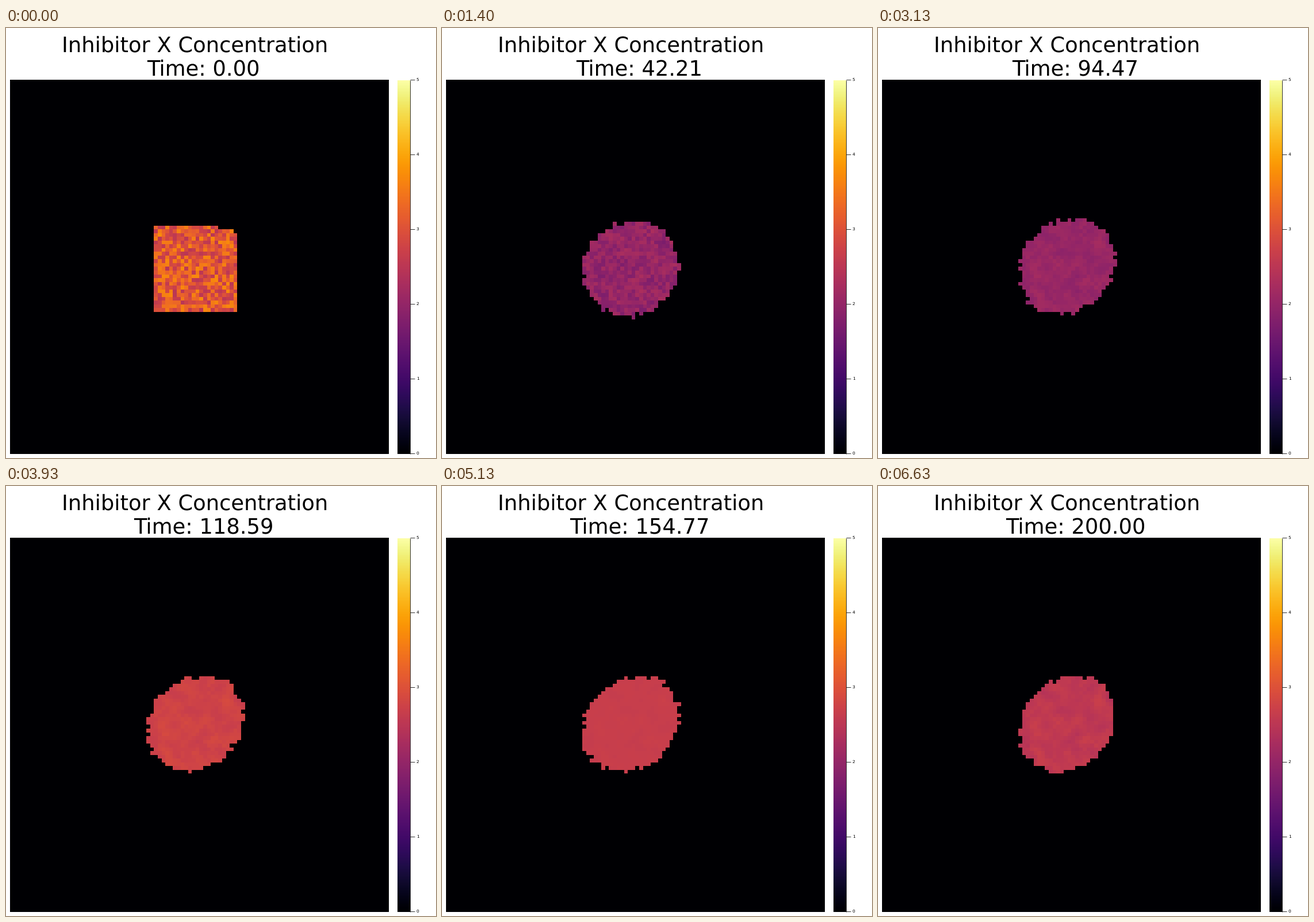
Recreate the animation shown at these times as a matplotlib script. Size 748 by 748 pixels, loop 6660 ms.

```python
import numpy as np
import matplotlib.pyplot as plt
from matplotlib.animation import FuncAnimation

SIZE, DPI, FRAMES, N, CELLS = 748, 100, 200, 100, 500
PX = 72 / DPI
plt.rcParams["font.family"] = "DejaVu Sans"
plt.rcParams["text.hinting"] = "none"

# Level and contrast of the concentration at a few steps
STEPS = [0, 20, 65, 94, 118, 154, 199]
MEAN = [3.1, 1.95, 2.1, 2.05, 2.76, 2.67, 2.55]
SPREAD = [0.62, -0.28, -0.31, 0.17, 0.12, 0.04, 0.14]

rng = np.random.default_rng(7)
rows, cols = np.mgrid[0:N, 0:N] + 0.5


def spot(col, row, radius):
    return np.exp(-((cols - col) ** 2 + (rows - row) ** 2) / radius ** 2)


def blur(a):
    a = sum(np.roll(a, d, 0) for d in (-1, 0, 1))
    return sum(np.roll(a, d, 1) for d in (-1, 0, 1)) / 9


grain = rng.uniform(-1, 1, (N, N))
smooth = (2.2 * blur(grain) + 0.25 - 1.5 * spot(36.5, 53.5, 3)
          - 0.6 * spot(45.5, 53.5, 3) - 0.5 * spot(54.5, 49.5, 4))
phase = rng.uniform(0, 2 * np.pi, (N, N))
speed = rng.uniform(0.15, 0.6, (N, N))

# Starting block, with a notch in its upper right edge
block = (np.minimum(11 - abs(cols - 49), 11.5 - abs(rows - 50.5))
         - 0.1 * spot(57.5, 39.5, 2.5))


def ellipse(i):
    """Blob that drifts up and stretches along the rising diagonal."""
    grown = min(1, i / 120)
    dx, dy = cols - 48.8, rows - 51 + 1.3 * grown
    stretch = 1 + 0.2 * grown
    rising, falling = (dx - dy) / np.sqrt(2), (dx + dy) / np.sqrt(2)
    return 12.6 - np.sqrt(rising ** 2 / stretch + falling ** 2 * stretch)


def blob(i):
    """The CELLS cells deepest inside the outline, so the area never changes."""
    relaxed = 1 - np.exp(-i / 8)
    field = (1 - relaxed) * block + relaxed * ellipse(i)
    field = field + 0.5 * relaxed * np.sin(phase + speed * i)
    return field >= np.partition(field, -CELLS, axis=None)[-CELLS]


def concentration(i):
    mix = min(0.7, i / 180)
    texture = (1 - mix) * grain + mix * smooth
    value = np.interp(i, STEPS, MEAN) + np.interp(i, STEPS, SPREAD) * texture
    return np.where(blob(i), value, 0)


fig = plt.figure(figsize=(SIZE / DPI, SIZE / DPI), dpi=DPI, facecolor="white")
ax = fig.add_axes([0, 0, 1, 1])


def heat(data, left, right, top):
    return ax.imshow(data, cmap="inferno", vmin=0, vmax=5, aspect="auto",
                     interpolation="nearest", extent=(left, right, 741, top))


grid = heat(concentration(0), 7, 666, 90)
heat(np.linspace(5, 0, 256)[:, None], 681, 703, 91)

line = dict(color="black", lw=0.8 * PX, solid_capstyle="butt")
ax.plot([703.5, 703.5], [90.5, 740.5], **line)
for v in range(6):
    y = 740.2 - 129.95 * v
    ax.plot([703.5, 711], [y, y], **line)
    ax.text(713.8, y, str(v), size=7.5 * PX, ha="left", va="center")

title = dict(size=36.9 * PX, ha="center", va="baseline")
ax.text(328.5, 41, "Inhibitor X Concentration", **title)
clock = ax.text(343.5, 82, "", **title)

ax.set(xlim=(0, SIZE), ylim=(SIZE, 0))
ax.axis("off")


def update(i):
    grid.set_data(concentration(i))
    clock.set_text(f"Time: {200 * i / (FRAMES - 1):.2f}")
    return grid, clock


anim = FuncAnimation(fig, update, frames=FRAMES, interval=33.3, repeat=True,
                     repeat_delay=0)
plt.show()
```
